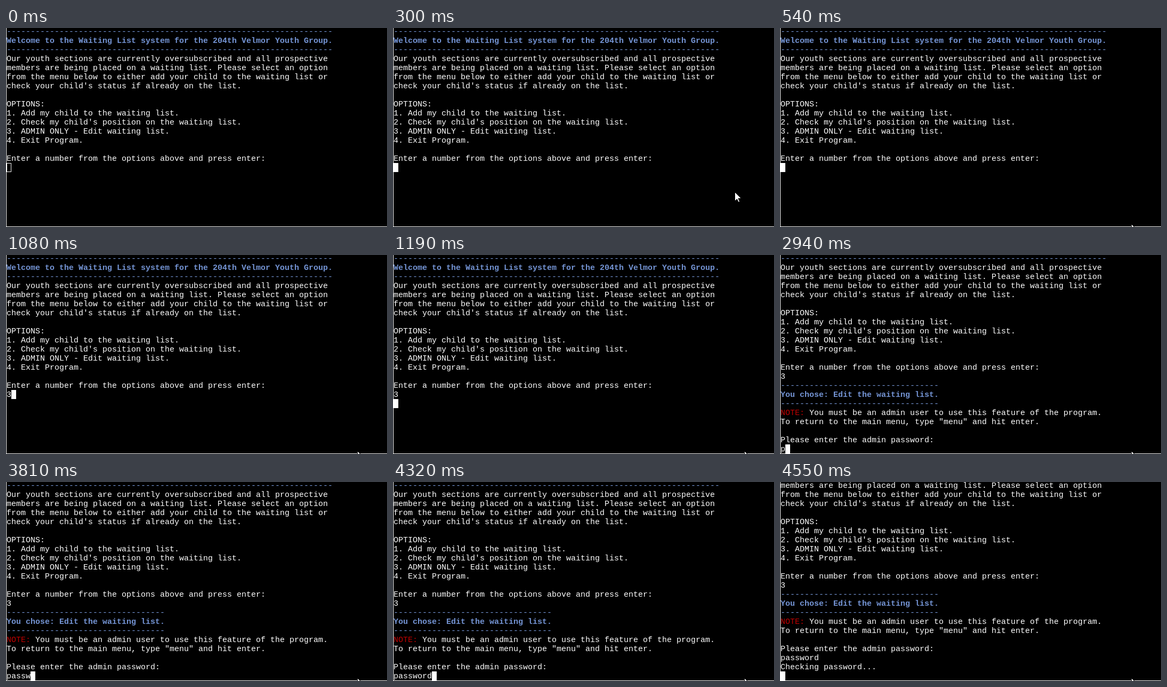
Animation of 715x373 px, one loop 8000 ms. Source, as an HTML page:

```html
<!DOCTYPE html>
<html lang="en">
<head>
<meta charset="utf-8">
<title>Waiting list terminal</title>
<style>
  html, body { margin: 0; width: 100%; height: 100%; overflow: hidden; background: #fff; }
  svg { display: block; width: 715px; height: 373px; }
  text { font: 15px "Liberation Mono", "Courier New", monospace; fill: #fff; }
  .blue { fill: #7494d4; }
  .bold { font-weight: bold; }
  .red { fill: #c00000; }
</style>
</head>
<body>
<svg viewBox="0 0 715 373">
  <rect x="1" width="714" height="372" fill="#000"/>
  <g id="lines"></g>
  <rect id="block" width="9" height="17" fill="#fff"/>
  <rect id="hollow" width="8" height="16" fill="none" stroke="#fff"/>
  <path id="pointer" d="M.5 .5V17.5L4.5 13.7L7.3 19.5L9.7 18.5L7 12.5H12.5Z" fill="#fff" stroke="#000"/>
</svg>
<script>
const LOOP = 8000, CELL = 9, ROW = 17, LEFT = 1, TOP = -2, BASE = 13;
const NS = "http://www.w3.org/2000/svg";
const $ = id => document.getElementById(id);
const rule = n => ["-".repeat(n), "blue"];

const LINES = [
  rule(68),
  ["Welcome to the Waiting List system for the 204th Velmor Youth Group.", "blue bold"],
  rule(68),
  ["Our youth sections are currently oversubscribed and all prospective"],
  ["members are being placed on a waiting list. Please select an option"],
  ["from the menu below to either add your child to the waiting list or"],
  ["check your child's status if already on the list."],
  [""],
  ["OPTIONS:"],
  ["1. Add my child to the waiting list."],
  ["2. Check my child's position on the waiting list."],
  ["3. ADMIN ONLY - Edit waiting list."],
  ["4. Exit Program."],
  [""],
  ["Enter a number from the options above and press enter:"],
  ["3"],
  rule(33),
  ["You chose: Edit the waiting list.", "blue bold"],
  rule(33),
  ["      You must be an admin user to use this feature of the program."],
  ["To return to the main menu, type \"menu\" and hit enter."],
  [""],
  ["Please enter the admin password:"],
  ["password"],
  ["Checking password..."]
];

// time, cursor line, characters typed on it, lines scrolled away
const STEPS = [
  [0, 15, 0, 0], [1080, 15, 1, 0], [1190, 16, 0, 0], [1210, 23, 0, 2],
  ...[2940, 3120, 3340, 3520, 3810, 4070, 4140, 4320].map((t, i) => [t, 23, i + 1, 2]),
  [4550, 25, 0, 4]
];

// time, x, y of the pointer tip
const PATH = [
  [20, 653, 364], [120, 645, 328], [210, 641, 310], [300, 641, 307],
  [340, 642, 311], [430, 651, 341], [540, 659, 367]
];
const FOCUS = 300;

function addText(str, cls, row) {
  const el = document.createElementNS(NS, "text");
  el.setAttribute("class", cls || "");
  const indent = str.length - str.trimStart().length;
  el.setAttribute("x", LEFT + indent * CELL);
  el.setAttribute("y", TOP + row * ROW + BASE);
  el.textContent = str.trimStart();
  $("lines").append(el);
  return el;
}

const rows = LINES.map(([str, cls], i) => addText(str, cls, i));
const note = addText("NOTE:", "red", 19);

const show = (el, on) => el.setAttribute("visibility", on ? "visible" : "hidden");
const move = (el, x, y) => el.setAttribute("transform", `translate(${x} ${y})`);

function pointerAt(t) {
  const i = PATH.findIndex(p => p[0] > t);
  if (i < 0) return PATH[PATH.length - 1].slice(1);
  const [a, b] = [PATH[i - 1], PATH[i]];
  const k = (t - a[0]) / (b[0] - a[0]);
  return [1, 2].map(j => Math.round(a[j] + (b[j] - a[j]) * k));
}

function draw(t) {
  const [, line, typed, scroll] = STEPS.filter(s => s[0] <= t).pop();
  rows.forEach((el, i) => {
    show(el, i <= line);
    const str = LINES[i][0].trimStart();
    const text = i === line ? str.slice(0, typed) : str;
    if (el.textContent !== text) el.textContent = text;
  });
  show(note, line > 19);
  move($("lines"), 0, -scroll * ROW);

  const x = LEFT + typed * CELL, y = TOP + (line - scroll) * ROW;
  move($("block"), x, y);
  move($("hollow"), x + 0.5, y + 0.5);
  show($("block"), t >= FOCUS);
  show($("hollow"), t < FOCUS);

  const moving = t >= PATH[0][0];
  show($("pointer"), moving);
  if (moving) move($("pointer"), ...pointerAt(t));
}

const start = performance.now();
function tick() {
  draw((performance.now() - start) % LOOP);
  requestAnimationFrame(tick);
}
tick();
</script>
</body>
</html>
```
